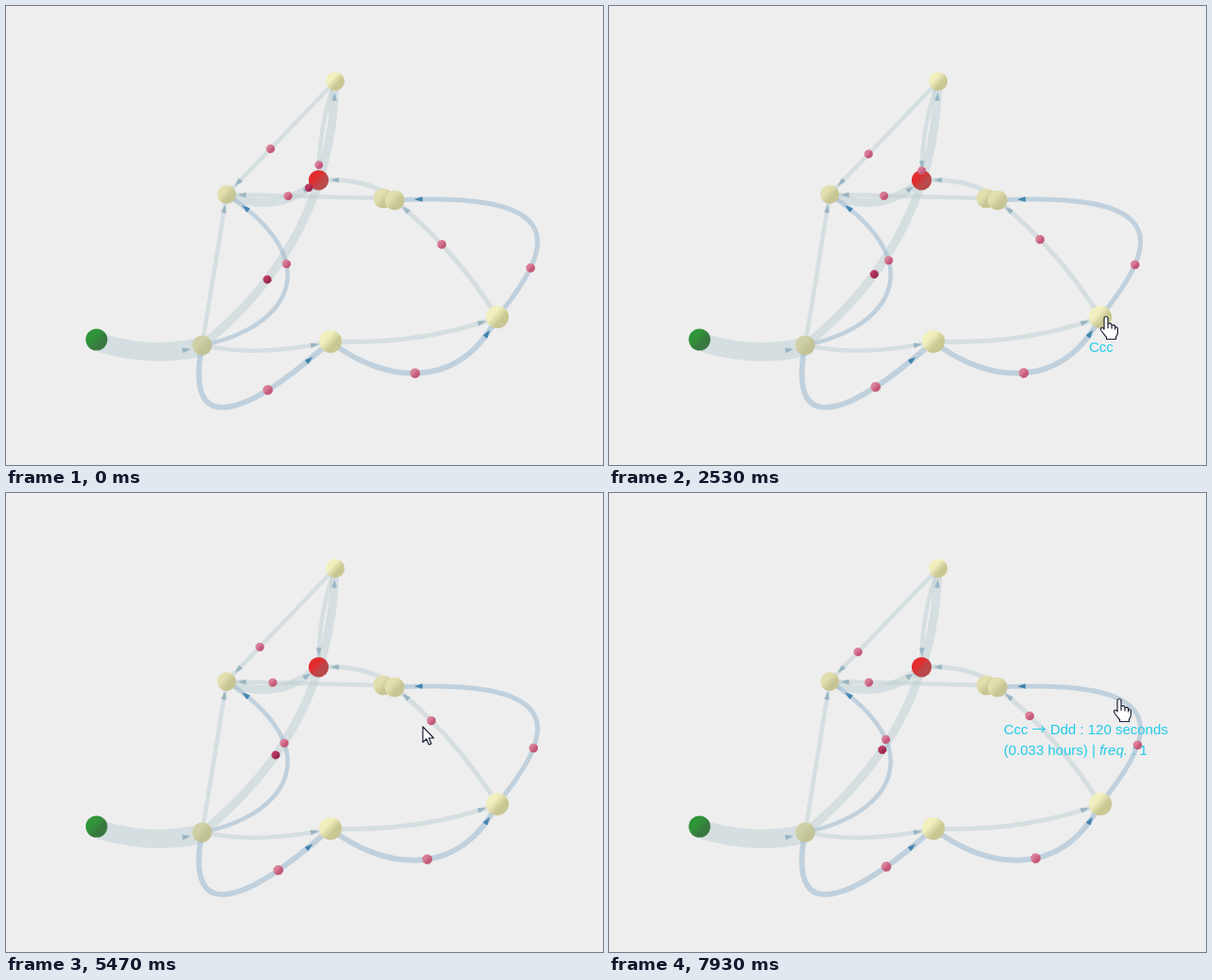
These frames come from a looping animation (633x487 px, 8 s). An HTML page:

```html
<!DOCTYPE html>
<html lang="en">
<head>
<meta charset="utf-8">
<title>Process graph</title>
<style>
  html, body { margin: 0; width: 100%; height: 100%; overflow: hidden; background: #eee; }
  svg { position: absolute; left: 0; top: 0; }
  #label {
    position: absolute; left: 0; top: 0; white-space: nowrap;
    font: 15px/22px "Liberation Sans", Arial, sans-serif; color: #22cbe9;
  }
  #label b { font: 15px/0 "Noto Sans CJK JP", "Noto Sans CJK SC", "Noto Sans CJK", sans-serif; }
</style>
</head>
<body>
<svg id="graph" width="633" height="487"></svg>
<div id="label"></div>
<svg id="pointer" width="633" height="487"></svg>
<script>
const LOOP = 8000, STEP = LOOP / 120;
const graph = document.getElementById('graph');
const label = document.getElementById('label');

function add(parent, tag, attrs) {
  const el = document.createElementNS('http://www.w3.org/2000/svg', tag);
  for (const key in attrs) el.setAttribute(key, attrs[key]);
  parent.append(el);
  return el;
}

function gradient(id, light, dark) {
  const g = add(graph, 'linearGradient', { id, x1: .12, y1: .15, x2: .88, y2: .85 });
  [[.3, light], [.68, dark], [1, dark]].forEach(([offset, color]) =>
    add(g, 'stop', { offset, 'stop-color': color }));
}
gradient('bright', '#f1efbe', '#c9c792');
gradient('dull', '#e1dfae', '#c6c593');
gradient('veiled', '#d0d0a6', '#c2c297');
gradient('green', '#30953a', '#38793f');
gradient('red', '#e22c2e', '#b9494b');
gradient('pink', '#d97d97', '#c4597a');
gradient('crimson', '#bd3a62', '#9c2a50');

// De Casteljau, works for lines, quadratics and cubics
function pointAt(pts, t) {
  while (pts.length > 1)
    pts = pts.slice(1).map((p, i) => [0, 1].map(k => pts[i][k] + (p[k] - pts[i][k]) * t));
  return pts[0];
}

const pathData = pts => `M${pts[0]}${['', '', 'L', 'Q', 'C'][pts.length]}${pts.slice(1).join(' ')}`;

const start = [96, 354], a = [208, 360], b = [344, 356], c = [521, 330],
      d1 = [400, 204], d2 = [412, 206], e = [349, 80], f = [234, 200], end = [331.5, 184.8];

// pts, width, blue?, arrow distance, dot: [from, to, radius, fill]
const links = [
  { pts: [[100, 357.5], [156, 374], [208, 361.5]], width: 20, arrow: 17 },
  { pts: [f, [287, 223], end], width: 9, arrow: 15, dot: [.885, 1.06, 4.5, 'crimson'] },
  { pts: [a, [345, 250], e], width: 9, arrow: 16, dot: [.294, .362, 4.7, 'crimson'] },
  { pts: [a, f], width: 4.5, arrow: 15 },
  { pts: [a, [270, 373], b], width: 4.5, arrow: 17 },
  { pts: [b, [440, 360], c], width: 5, arrow: 17 },
  { pts: [c, [476.5, 259], d2], width: 5, arrow: 15, dot: [.586, .725, 5, 'pink'] },
  { pts: [d2, [386, 182], end], width: 4.8, arrow: 17 },
  { pts: [d1, f], width: 4.5, arrow: 16, dot: [.608, .75, 4.8, 'pink'] },
  { pts: [e, [331, 128], end], width: 4.5, arrow: 16, dot: [.856, 1.026, 4.6, 'pink'] },
  { pts: [e, f], width: 4.5, arrow: 17, dot: [.596, .739, 4.8, 'pink'] },
  { pts: [a, [299, 342], [344, 272], f], width: 4.5, blue: true, arrow: 24, dot: [.645, .707, 4.8, 'pink'] },
  { pts: [a, [190, 451], [243, 446], b], width: 5.8, blue: true, arrow: 29, dot: [.75, .819, 5.5, 'pink'] },
  { pts: [b, [400, 400], [480, 410], c], width: 5.8, blue: true, arrow: 20, dot: [.477, .575, 5.5, 'pink'] },
  { pts: [c, [579, 258], [606, 196], d2], width: 5, blue: true, arrow: 25, dot: [.255, .312, 5, 'pink'] },
];

function addArrow({ pts, arrow, blue }) {
  const [ex, ey] = pts.at(-1);
  let t = 1, p;
  do p = pointAt(pts, t -= .002);
  while (Math.hypot(p[0] - ex, p[1] - ey) < arrow);
  const q = pointAt(pts, t + .01);
  const angle = Math.atan2(q[1] - p[1], q[0] - p[0]) * 180 / Math.PI;
  add(graph, 'path', {
    d: 'M4.5 0L-4 2.8Q-5 0-4-2.8Z', fill: blue ? '#4385ad' : '#9ab5c3',
    transform: `translate(${p}) rotate(${angle})`,
  });
}

for (const { pts, width, blue } of links)
  add(graph, 'path', {
    d: pathData(pts), fill: 'none', 'stroke-width': width,
    stroke: blue ? 'rgba(148,180,206,.5)' : 'rgba(190,207,211,.5)',
  });
links.forEach(addArrow);

[[start, 11.5, 'green'], [a, 10.5, 'veiled'], [b, 12, 'bright'], [c, 12, 'bright'],
 [d1, 10.5, 'dull'], [d2, 10.5, 'dull'], [e, 10, 'bright'], [f, 10, 'dull'], [end, 10.6, 'red']]
  .forEach(([[cx, cy], r, fill]) => add(graph, 'circle', { cx, cy, r, fill: `url(#${fill})` }));

const octagon = r => Array.from({ length: 8 }, (_, i) => {
  const angle = (i + .3) * Math.PI / 4;
  return [r * Math.cos(angle), r * Math.sin(angle)];
}).join(' ');

const dots = links.filter(link => link.dot).map(({ pts, dot: [from, to, r, fill] }) => ({
  pts, from, to,
  el: add(graph, 'polygon', { points: octagon(r), fill: `url(#${fill})` }),
}));

const pointer = add(document.getElementById('pointer'), 'path', {
  fill: '#fff', stroke: '#1b2034', 'stroke-width': 1.2, 'stroke-linejoin': 'round',
});
const HAND = 'M-2 1.5a2 2 0 0 1 4 0V10V8.5a2 2 0 0 1 4 .3V10.5V10a1.8 1.8 0 0 1 3.6.3V12V11.5' +
  'a1.5 1.5 0 0 1 2.8.5V16Q12.4 19 10.5 21V23.5H.5V21.5Q-2.5 18-5 14.5Q-6.5 12-4.5 11.3Q-3 11-2 13Z' +
  'M2 9.5V12M6 10V12.5M9.6 11.5V13.5';
const ARROW = 'M0 0V16.5L3.8 13L6.5 19L9 18L6.4 12H11.5Z';

// time, x, y of the pointer's hot spot
const track = [
  [930, 650, 423], [1130, 595, 422], [1730, 548, 383], [2400, 527, 330], [2780, 527, 330],
  [3530, 415, 211], [4400, 415, 211], [5200, 442, 248], [5600, 442, 248],
  [6070, 453, 244], [6670, 453, 244], [7530, 541, 219], [8000, 541, 219],
];

// from, to, left offset, text
const ARC = 'Ccc <b>→</b> Ddd : ';
const hover = [
  [2330, 2720, -18, 'Ccc'],
  [2720, 2880, -114, ARC + '60 seconds<br>(0.017 hours) | <i>freq.</i> : 1'],
  [3660, 4460, -15, 'Ddd'],
  [6060, 6720, -162, ARC + '60 seconds (0.017 hours) |<br><i>freq.</i> : 1'],
  [7520, 8000, -122.5, ARC + '120 seconds<br>(0.033 hours) | <i>freq.</i> : 1'],
];
let shownText = null;

function trackAt(t) {
  const i = track.findIndex(k => k[0] > t);
  if (i < 1) return null;
  const [t0, x0, y0] = track[i - 1], [t1, x1, y1] = track[i];
  const u = (t - t0) / (t1 - t0), s = u * u * (3 - 2 * u);
  return [x0 + (x1 - x0) * s, y0 + (y1 - y0) * s];
}

function draw(time) {
  const t = Math.floor(((time % LOOP) + 4) / STEP) % 120 * STEP;

  for (const { pts, from, to, el } of dots) {
    const u = from + (to - from) * t / 7933;
    el.setAttribute('transform', `translate(${pointAt(pts, Math.min(u, 1))})`);
    // dots sink into the end node
    el.setAttribute('visibility', u < .93 ? 'visible' : 'hidden');
  }

  const spot = trackAt(t);
  pointer.setAttribute('visibility', spot ? 'visible' : 'hidden');
  if (spot) {
    pointer.setAttribute('d', t > 4500 && t < 5900 ? ARROW : HAND);
    pointer.setAttribute('transform', `translate(${spot})`);
  }

  const tip = hover.find(([from, to]) => t >= from && t < to);
  const text = tip ? tip[3] : '';
  if (text !== shownText) label.innerHTML = shownText = text;
  if (tip) label.style.transform = `translate(${spot[0] + tip[2]}px, ${spot[1] + 21}px)`;
}

const begin = performance.now();
function tick() {
  draw(performance.now() - begin);
  requestAnimationFrame(tick);
}
tick();
</script>
</body>
</html>
```
